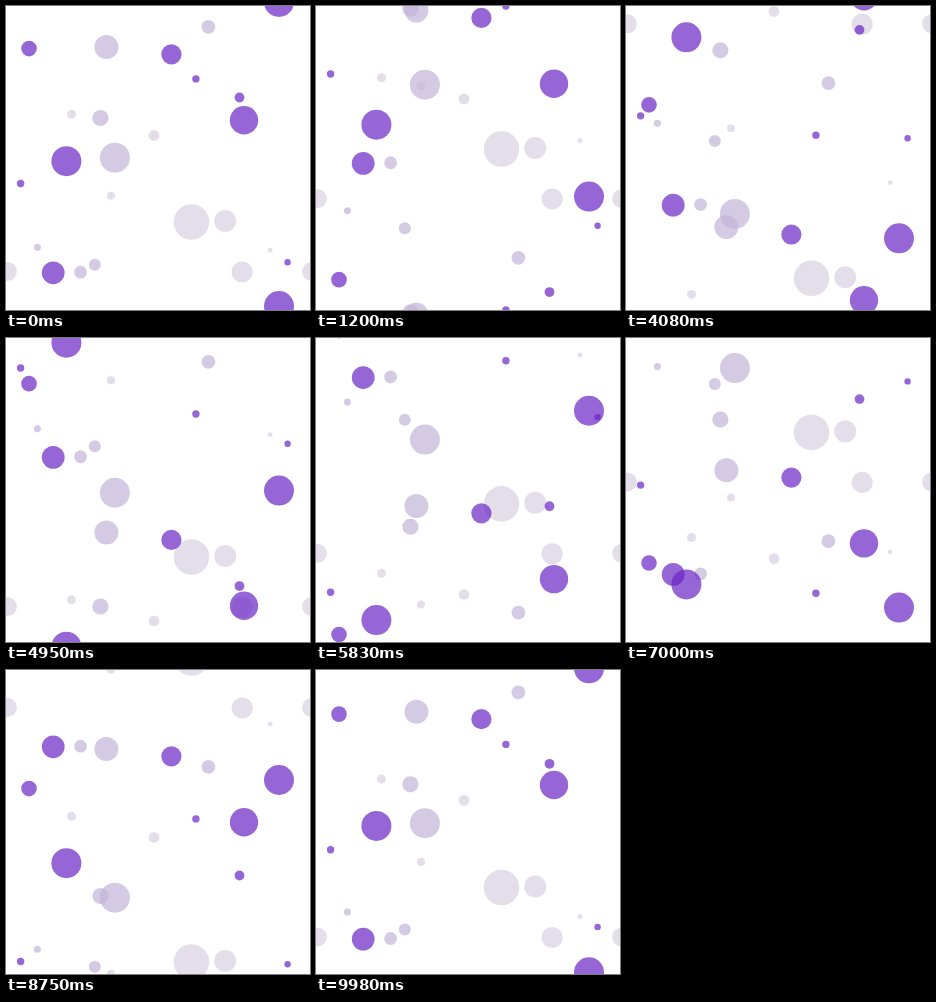
Animation of 304 by 304 pixels, one loop 10000 ms. Source, as an HTML page with a canvas:

```html
<!DOCTYPE html>
<html lang="en">
<head>
<meta charset="utf-8">
<title>Rising dots</title>
<style>
  html, body { margin: 0; width: 100%; height: 100%; overflow: hidden; background: #fff; }
  canvas { display: block; }
</style>
</head>
<body>
<canvas id="stage" width="304" height="304"></canvas>
<script>
const SIZE = 304, LOOP = 10000, STEPS = 400;
const ctx = document.getElementById('stage').getContext('2d');

const pale = 'rgb(216, 208, 226)', lilac = 'rgb(194, 179, 215)', violet = 'rgb(106, 36, 196)';

// Back to front. Each group shares a color and a whole number of wraps per loop;
// each dot is its starting point and radius.
const groups = [
  [pale, 1, [65.5, 108.3, 4.5], [148, 129.4, 5.4]],
  [pale, 2, [185.5, 216, 17.8], [219.2, 215, 11], [1.5, 265.5, 9.4], [236.2, 266, 10.6]],
  [pale, 3, [105, 189.8, 4], [264.2, 244.2, 2.4]],
  [lilac, 1, [100.4, 41, 12], [31.4, 241.2, 3.5], [88.8, 258.8, 6]],
  [lilac, 2, [202.4, 20.8, 6.9], [108.9, 151.7, 15]],
  [lilac, 3, [94.4, 112, 8.1], [74.6, 266.2, 6.4]],
  [violet, 1, [165.4, 48.4, 10.1], [238, 114.2, 14.2], [60.4, 155.2, 15], [281.6, 256.2, 3.2]],
  [violet, 2, [23, 42.6, 7.8], [189.9, 72.9, 3.7]],
  [violet, 3, [233.5, 91.5, 4.9], [14.6, 177.5, 3.7], [47.2, 266.8, 11.4], [273, 300, 15]]
];

function drawDot(x, y, r) {
  ctx.beginPath();
  ctx.arc(x, y, r, 0, Math.PI * 2);
  ctx.fill();
}

// Repeat the dot one stage away on every side, so the picture tiles.
function drawTiled(x, y, r) {
  for (const dx of [-SIZE, 0, SIZE])
    for (const dy of [-SIZE, 0, SIZE])
      drawDot(x + dx, y + dy, r);
}

function render(now) {
  // 40 steps per second, each starting on a 10 ms tick.
  const step = Math.floor(Math.floor((now % LOOP) / 10) / 2.5);
  ctx.clearRect(0, 0, SIZE, SIZE);
  ctx.globalAlpha = 0.7;
  for (const [color, wraps, ...dots] of groups) {
    const rise = wraps * SIZE * step / STEPS;
    ctx.fillStyle = color;
    for (const [x, y, r] of dots)
      drawTiled(x, (y - rise + wraps * SIZE) % SIZE, r);
  }
}

const start = performance.now();
function tick() {
  render(performance.now() - start);
  requestAnimationFrame(tick);
}
tick();
</script>
</body>
</html>
```
